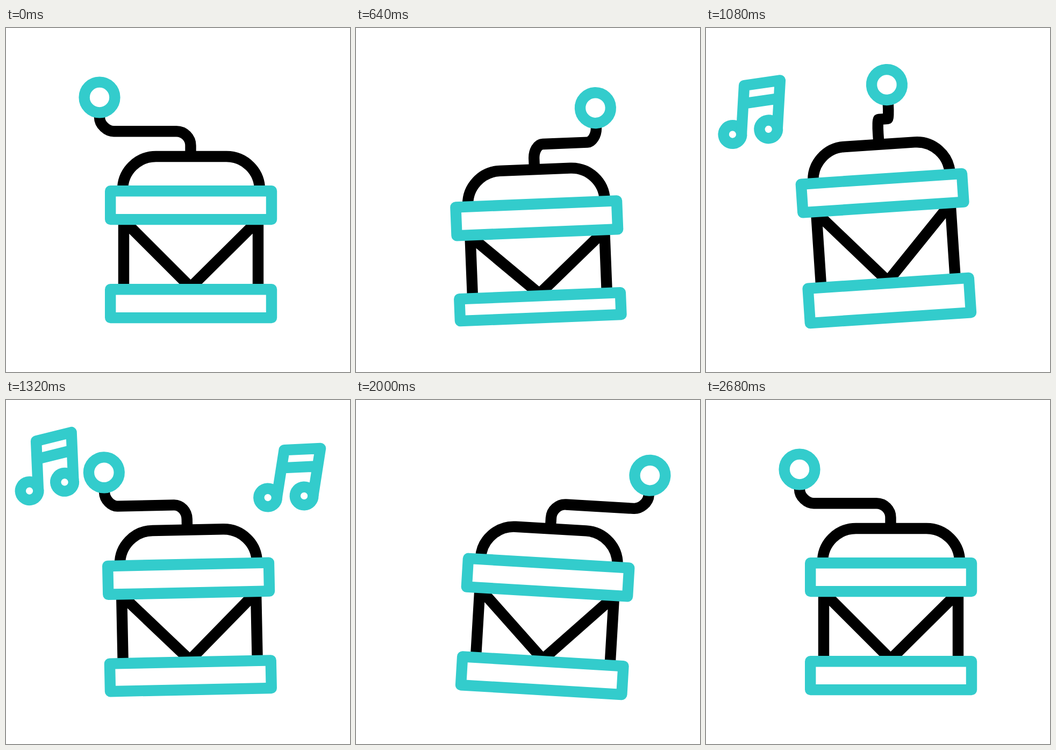
Write an HTML page that moves like this. It is 640 px wide and 640 px high and loops after 2800 ms.

```html
<!DOCTYPE html>
<html lang="en">
<head>
<meta charset="utf-8">
<title>Music box</title>
<style>
html, body { margin: 0; width: 100%; height: 100%; overflow: hidden; background: #fff; }
svg { display: block; width: 100%; height: 100%; }
.line { fill: none; stroke: #000; stroke-width: 20.4; stroke-linejoin: round; }
.teal { stroke: #33cccc; }
.solid { fill: #fff; }
</style>
</head>
<body>
<svg viewBox="0 0 640 640">
  <g id="left" class="line teal"></g>
  <g id="right" class="line teal"></g>
  <g id="machine">
    <path id="legs" class="line"/>
    <g id="top">
      <path id="crank" class="line"/>
      <path class="line" d="M217 304V301A62 62 0 0 1 279 239H410A62 62 0 0 1 472 301V304"/>
      <circle id="knob" class="line teal solid" cy="129" r="28.4"/>
      <rect class="line teal solid" x="194.2" y="303.2" width="299.8" height="52.9"/>
    </g>
    <rect id="base" class="line teal solid" x="194.2" width="299.8"/>
  </g>
</svg>
<script>
const LOOP = 2800, STEP = 40, SQUASH = 25.5;
const $ = id => document.getElementById(id);
const mix = (a, b, p) => a + (b - a) * p;
const ease = p => p * p * (3 - 2 * p);
const span = (t, a, b) => ease(Math.min(1, Math.max(0, (t - a) / (b - a))));
const bend = ([a, b, c], p) => mix(mix(a, b, p), mix(b, c, p), p);

// Eased value between [time, value] keys
function track(keys, t) {
  let v = keys[0][1];
  for (let i = 1; i < keys.length; i++) {
    const [t0, v0] = keys[i - 1], [t1, v1] = keys[i];
    if (t >= t0) v = mix(v0, v1, span(t, t0, t1));
  }
  return v;
}

const tilt = [[200, 0], [1000, -4], [1800, 4], [2600, 0]];
const turn = [[200, 0], [800, 1], [1400, 0], [2000, 1], [2600, 0]];
const press = [[200, 0], [600, 1], [1000, -1], [1600, 1], [1800, 1], [2200, -1], [2600, 0]];

const notes = [
  { id: "left", from: 800, to: 1700, fade: [1600, 1688],
    x: [105.5, 75.5, 82.5], y: [167.5, 124.5, 81.5], rot: [-0.9, -20, -11.5] },
  { id: "right", from: 1080, to: 1720, fade: [1610, 1705],
    x: [553, 516, 544], y: [169, 116.5, 64], rot: [-5, -1.25, 2.5] }
];

// Beamed pair of notes, centred on the origin
const noteShape = `<circle cx="-51" cy="43.5" r="16.8"/><circle cx="16.5" cy="43.5" r="16.8"/>
  <path d="M-34.2 43.5L-16.5 -43.5H51L33.3 43.5M-23 -10.5H44"/>`;
notes.forEach(n => $(n.id).innerHTML = noteShape);

function drawNote(n, t) {
  const p = span(t, n.from, n.to);
  const alpha = span(t, n.from, n.from + 80) * (1 - span(t, ...n.fade));
  $(n.id).setAttribute("opacity", alpha);
  $(n.id).setAttribute("transform",
    `translate(${bend(n.x, p)} ${bend(n.y, p)}) rotate(${bend(n.rot, p)})`);
}

function crankPath(p) {
  const stem = 343.5;
  const end = stem + mix(-169.5, 179, p);
  const endIn = stem + mix(-143, 152.5, p);
  const bar = stem + mix(-26.5, 26.5, p);
  const k = 0.55;
  return `M${end} 158V166C${end} ${166 + 26.3 * k} ${mix(endIn, end, 1 - k)} 192.3 ${endIn} 192.3` +
    `L${bar} 192.3C${mix(bar, stem, k)} 192.3 ${stem} ${218.8 - 26.5 * k} ${stem} 218.8V239`;
}

function draw(t) {
  const drop = track(press, t) * SQUASH, half = drop / 2;
  const p = track(turn, t);
  $("machine").setAttribute("transform", `rotate(${track(tilt, t)} 344 549)`);
  $("top").setAttribute("transform", `translate(0 ${drop})`);
  $("crank").setAttribute("d", crankPath(p));
  $("knob").setAttribute("cx", mix(174, 522.5, p));
  $("base").setAttribute("y", 486.2 + half);
  $("base").setAttribute("height", 52.9 - half);
  const up = 358 + drop, low = 482.5 + half;
  $("legs").setAttribute("d", `M219 ${low}V${up}L343.5 ${low}L469 ${up}V${low}`);
  notes.forEach(n => drawNote(n, t));
}

function loop() {
  draw(Math.floor(performance.now() % LOOP / STEP) * STEP);
  requestAnimationFrame(loop);
}
loop();
</script>
</body>
</html>
```
